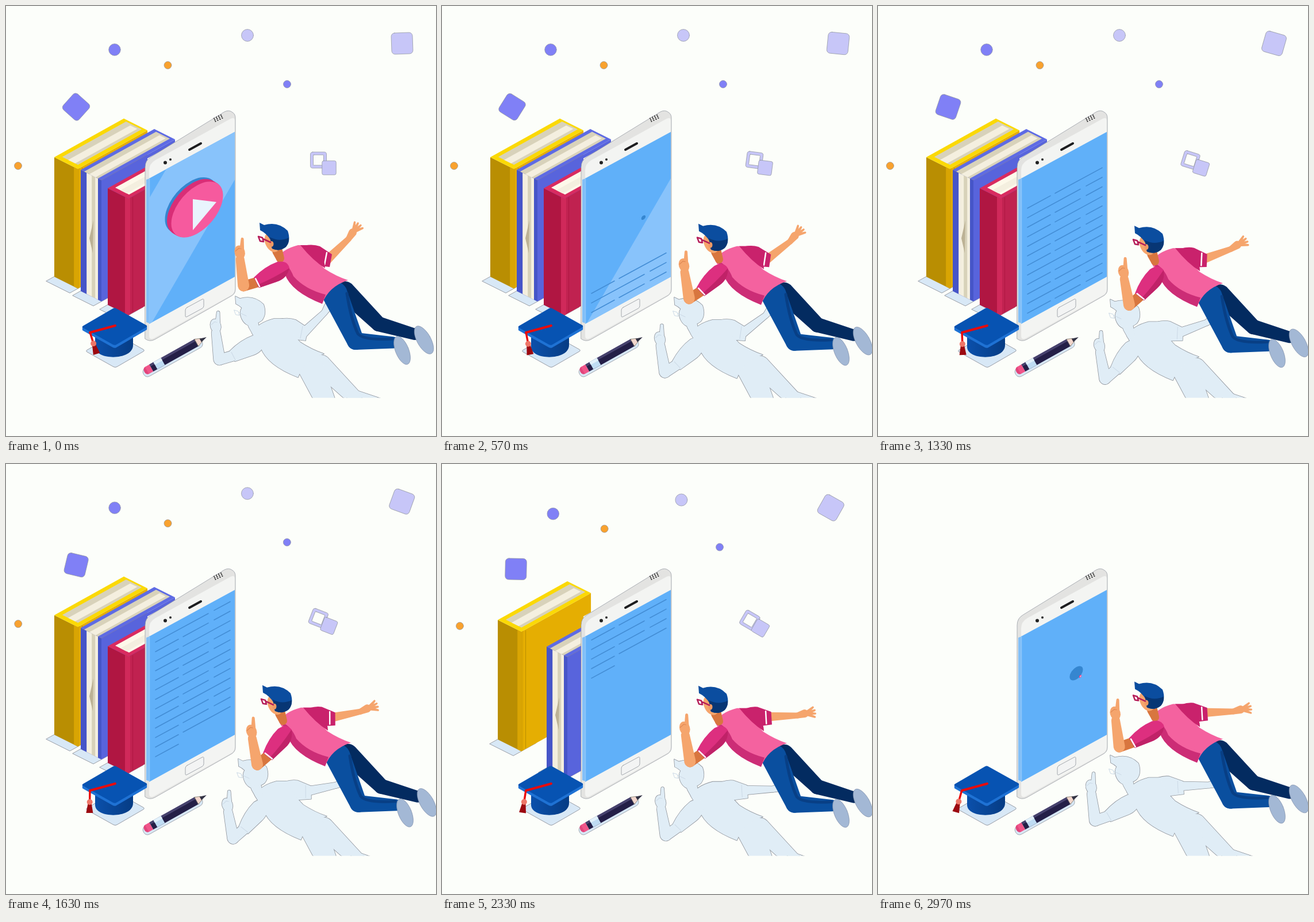
An HTML page with a canvas that plays this animation: 748 by 748 pixels, repeating every 3.01 s.

```html
<!DOCTYPE html>
<html lang="en">
<head>
<meta charset="utf-8">
<title>Online learning</title>
<style>
html, body { margin: 0; width: 100%; height: 100%; overflow: hidden; background: #fcfefa; }
canvas { display: block; width: 748px; height: 748px; }
</style>
</head>
<body>
<canvas id="stage" width="748" height="748"></canvas>
<script>
const c = document.getElementById('stage').getContext('2d');
const LOOP = 3010, TAU = Math.PI * 2, RAD = Math.PI / 180;
const SLOPE = 0.542, DEPTH = -0.555, WIDTH = 0.5;   // slants of the isometric planes
const PAPER = '#fcfefa', GREY = '#8f949c', FLOOR = '#d8e8f6', SKIN = '#f5a56d', DARK_SKIN = '#d8763f';
let time = 0;
let ghost = '';   // '' | 'outline' | 'fill', the passes of the floor shadow

const clamp = v => Math.max(0, Math.min(1, v));

function group(draw) { c.save(); draw(); c.restore(); }

function turn(x, y, degrees) {
  c.translate(x, y);
  c.rotate(degrees * RAD);
  c.translate(-x, -y);
}

function plane(ax, ay, bx, by, x, y, draw) {
  group(() => { c.transform(ax, ay, bx, by, x, y); draw(); });
}

function paint(path, color, edge) {
  if (ghost === 'outline') {
    c.strokeStyle = GREY; c.lineWidth = 1.6; c.stroke(path);
    return;
  }
  c.fillStyle = ghost ? '#e0edf6' : color;
  c.fill(path);
  if (edge && !ghost) { c.strokeStyle = edge; c.lineWidth = 0.7; c.stroke(path); }
}

const shape = (color, d, edge) => paint(new Path2D(d), color, edge);

function oval(color, x, y, rx, ry = rx, tilt = 0, edge) {
  const path = new Path2D();
  path.ellipse(x, y, rx, ry, tilt * RAD, 0, TAU);
  paint(path, color, edge);
}

function rect(color, x, y, w, h, r = 0, edge) {
  const path = new Path2D();
  path.roundRect(x, y, w, h, r);
  paint(path, color, edge);
}

function line(color, width, d) {
  if (ghost === 'outline') return;
  c.strokeStyle = ghost ? '#cbd9e6' : color;
  c.lineWidth = ghost ? 1 : width;
  c.lineCap = c.lineJoin = 'round';
  c.stroke(new Path2D(d));
}

// Tapered tube from joint to joint, each given as [x, y, radius]
function limb(color, ...joints) {
  for (let i = 1; i < joints.length; i++) {
    const [x, y, r] = joints[i - 1], [u, v, s] = joints[i];
    const a = Math.atan2(v - y, u - x);
    const b = Math.acos((r - s) / Math.hypot(u - x, v - y));
    const path = new Path2D();
    path.arc(x, y, r, a + b, a - b + TAU);
    path.arc(u, v, s, a - b, a + b);
    path.closePath();
    paint(path, color);
  }
}

function floaters() {
  // Everything accelerates towards the phone near the end
  const k = Math.min(1, 2 ** ((time - 2955) / 128));
  const at = (x, y, draw) => group(() => {
    c.translate(x + (314 - x) * k, y + (388 - y) * k);
    draw();
  });
  const square = (color, x, y, size, r, angle, hole) => group(() => {
    c.translate(x, y);
    c.rotate(angle * RAD);
    rect(color, -size / 2, -size / 2, size, size, r, GREY);
    if (hole) rect(PAPER, -hole / 2, -hole / 2, hole, hole, 1, GREY);
  });
  const dot = (color, x, y, r) => at(x, y, () => oval(color, 0, 0, r, r, 0, GREY));
  const violet = '#8080f6', lilac = '#c7c6f8', orange = '#f9a22e', s = time / 1000;
  dot(violet, 189, 76, 10.3);
  dot(lilac, 420, 51, 10.5);
  dot(orange, 281.5, 103, 6.5);
  dot(violet, 489, 136, 6.5);
  dot(orange, 21, 278, 6.5);
  at(689, 65, () => square(lilac, 0, 0, 37, 6, 13.5 * s - 2));
  at(122, 175.5, () => square(violet, 0, 0, 37, 6, 42 - 17.5 * s));
  at(552, 274, () => {
    square(lilac, -8.5, -6, 28, 4, 13 * s, 18);
    square(lilac, 10, 7.5, 24.5, 3, 13 * s);
  });
}

function book(start, x, y, thick, depth, height, color, open) {
  const d = 2.8e-4 * Math.max(0, time - start) ** 2;
  const lip = thick / 6, page = '#d8d2ba', white = '#f4efdf';
  x += d;
  y += d * 0.63;
  plane(1, WIDTH, 1, DEPTH, x, y + height, () => rect(FLOOR, 0, -14, thick, 40, 0, GREY));
  plane(1, DEPTH, 0, 1, x + thick, y + thick * WIDTH, () => {
    rect(color.face, 0, 0, depth, height);
    if (!open) {
      rect(color.hinge, 0, 0, 3, height);
      rect(color.spine, 7, 2, 1, height - 3);
    }
  });
  plane(1, WIDTH, 0, 1, x, y, () => {
    rect(color.spine, 0, 0, thick, height);
    if (open) {
      rect(white, lip * 1.7, 0, thick - lip * 2.7, height);
      rect(page, lip * 3.2, 0, lip, height);
    } else rect(color.hinge, thick - lip, 0, lip, height);
  });
  if (open) shape('#bcb295', `M${x + 22} ${y + 88}l-7 31l6 26Z`);
  plane(1, WIDTH, 1, DEPTH, x, y, () => {
    rect(color.top, 0, 0, thick, depth);
    const head = open ? 0 : 7;
    rect(color.page || page, lip, head, thick - lip * 2, depth - head - 3);
    rect(white, lip * 2.5, head, thick - lip * 4.2, depth - head - 6);
  });
}

function books() {
  group(() => {
    c.clip(new Path2D('M0 0H410V175L246 265V748H0Z'));
    book(2115, 84, 263, 41, 121, 208,
      { top: '#fbd905', spine: '#b98e02', face: '#e5ae02', hinge: '#d9a503' });
    book(1900, 130, 285, 36, 128, 211,
      { top: '#5e6be4', spine: '#4655c8', face: '#5864dc' }, true);
    book(1715, 177, 317, 36, 100, 203,
      { top: '#d92b60', spine: '#b01642', face: '#c02250', hinge: '#d0295a', page: '#fdf9ea' });
  });
}

function textLines() {
  const top = 352 - (time - 1330) * 0.195, rows = 14;
  for (let i = 0; i < rows; i++) {
    const y = top + i * 16.6;
    if (y < 306 || y > 540) continue;
    const at = x => `${x} ${y - (x - 260) * SLOPE}`;
    let d = 'M' + at(260);
    if (i === rows - 1) d += 'L' + at(300);
    else {
      if (i % 3 !== 1) d += `L${at(300)}M${at(308)}`;
      if (i % 3 !== 0) d += `L${at(352)}M${at(362)}`;
      d += 'L' + at(390);
    }
    line('#438dd5', 1.6, d);
  }
}

function playButton() {
  const size = (from, to) => clamp(time > 2500 ? (time - from) / 480 : (to - time) / 400);
  const disc = (color, x, y) =>
    plane(1, -SLOPE, 0, 1, x, y, () => oval(color, 0, 0, 45, 42));
  const scaled = (s, draw) => s > 0 &&
    plane(s, 0, 0, s, 353 * (1 - s), 370 * (1 - s), draw);
  scaled(size(2848, 604), () => disc('#3586d0', 321.5, 346.5));
  scaled(size(2950, 550), () => {
    for (let i = 0; i < 8; i++) disc('#d92e77', 325 + i, 349.5 + i * 0.6);
    disc('#f65a9e', 332.5, 354);
    shape('#e9f4fd', 'M325 336L366 341L325 390Z');
  });
}

function phone() {
  shape('#e3e3e1', 'M242 280Q242 268 253 262L380 184Q388 180 394 185Q399 188 399 195V493Q399 501 391 505L259 580Q250 585 242 579Z', GREY);
  shape('#f3f4f2', 'M249 286Q249 274 260 268L389 197Q398 192 398 200V492Q398 500 390 504L259 577Q249 583 249 573Z');
  for (let i = 0; i < 12; i++) {
    const col = i % 4, row = i >> 2;
    oval('#222', 362 + col * 4 + row * 1.2, 195.5 - col * 1.9 + row * 2.6, 1.1);
  }
  oval('#222', 277, 272.5, 3);
  oval('#333', 286, 267, 2.1);
  line('#1d1d1f', 4, 'M319 250L339 239');
  shape('#82bff7', 'M244 302L250 300V552L244 550Z');
  group(() => {
    c.clip(new Path2D('M249 300L398 219V471L249 553Z'));
    rect('#60b0f9', 240, 200, 160, 360);
    const glare = 327 + 0.226 * time;
    if (time < 1300) shape('#88c3fb', `M${glare} 200h130l-209 360h-130Z`);
    textLines();
    playButton();
  });
  line('#8cc6fb', 1.5, 'M249.5 300V552');
  plane(1, -SLOPE, 0, 1, 312, 526, () => rect('#f3f4f4', 0, 0, 32, 16, 3, GREY));
}

function cap() {
  const tile = (color, x, y, size, edge) =>
    plane(1, 0.56, -1, 0.58, x, y, () => rect(color, 0, 0, size, size, 3, edge));
  tile(FLOOR, 190, 570, 52, GREY);
  const side = c.createLinearGradient(155, 0, 221, 0);
  side.addColorStop(0, '#0b50ab');
  side.addColorStop(1, '#063c84');
  shape(side, 'M155 565V593C155 617 221 617 221 590V565Z');
  for (let i = 5; i > 0; i--) tile('#1f72d4', 189, 524.5 + i, 58);
  tile('#0753b2', 189, 524.5, 58);
  line('#e90b0b', 4, 'M190 556L146 568');
  group(() => {
    turn(146, 567, -17 + 33 * time / LOOP);
    line('#e90b0b', 3.5, 'M146 568V584');
    shape('#9c0910', 'M143 590H149L152 607H140Z');
    oval('#ee7668', 146, 588, 5);
  });
}

function pencil() {
  group(() => {
    c.translate(245, 634);
    c.rotate(-0.51);
    rect(FLOOR, -8, -5, 116, 16, 7, GREY);
    oval('#e2447b', 0, 0, 5, 7);
    rect('#f0568a', 0, -7, 9, 14);
    rect('#241f47', 9, -7, 91, 14);
    rect('#47426e', 9, -7, 91, 4);
    rect('#bfdcf3', 17, -7, 15, 14);
    rect('#e2f1fb', 17, -7, 15, 5);
    shape('#f2d6cc', 'M99 -7L109 -3V3L99 7Z', '#776');
    shape('#333344', 'M107 -3.5L119 0L107 3.5Z');
  });
}

function rearArm() {
  const swing = clamp(time / 1930) ** 1.5;
  turn(528, 425, -14 * swing);
  group(() => {
    turn(561, 440, 56 * swing);
    limb(SKIN, [558, 442, 8], [596, 405, 5], [603, 394, 7]);
    for (let i = 0; i < 4; i++) {
      const a = (-82 + i * 19) * RAD;
      limb(SKIN, [604, 393, 3.2], [604 + 18 * Math.cos(a), 394 + 18 * Math.sin(a), 1.7]);
    }
  });
  shape('#c9226c', 'M506 420Q530 412 546 418L567 432L563 454L530 450Z');
  line('#fff', 2.5, 'M558 429L554 450');
}

function legs() {
  limb('#032b60', [590, 496, 17], [648, 553, 13], [711, 571, 10]);
  oval('#a3b8d5', 727, 581, 12, 27, -29, '#7b8ca6');
  limb('#0a4f9f', [572, 501, 22], [608, 583, 15], [674, 585.5, 10]);
  if (!ghost) line('#083f85', 5, 'M593 500Q600 545 612 570Q622 582 672 579');
  oval('#a3b8d5', 689, 599, 11.5, 26, -22, '#7b8ca6');
}

function torso() {
  shape('#f4629f', 'M470 441Q480 423 508 416L527 416Q536 440 554 457Q574 470 595 477Q561 488 550 518Q496 497 485 466Z');
  if (ghost) return;
  shape('#cc2d76', 'M474 441Q492 449 500 470Q520 493 556 502L550 518Q496 497 485 466Z');
  shape('#c9226c', 'M512 416H530L547 430Q555 445 555 456Q534 443 512 416Z');
}

function head() {
  limb(DARK_SKIN, [472, 426, 9], [477, 439, 7]);
  oval(SKIN, 463, 411, 12, 18, -25);
  shape('#0b4d9f', 'M441 377L449 381Q473 374 490 391Q496 408 487 419Q476 428 463 422Q459 414 461 408Q453 395 442 390Z');
  if (!ghost) {
    shape('#073674', 'M459 402Q475 411 492 403Q493 412 487 419Q476 428 463 422Z');
    oval('#ee9a64', 462, 414, 3.5, 5);
  }
  line('#b51c58', 2.5, 'M439 401L446 403L448 410L442 409Z M447 405L460 411');
}

function frontArm() {
  const lift = Math.sin(Math.PI * time / LOOP) ** 0.65;
  turn(488, 458, -25 * lift);
  limb(DARK_SKIN, [437, 480, 9], [413, 487, 9]);
  group(() => {
    turn(413, 487, 21.5 * lift);
    limb(SKIN, [413, 486, 10], [407, 440, 7.5]);
    oval(SKIN, 406.5, 428, 9, 12, -15);
    limb(SKIN, [410, 424, 4], [411, 405, 2.5]);
    line('#dc8450', 1, 'M399 426L405 421L409 422');
  });
  shape('#dd2f7f', 'M431 472Q450 453 472 445Q490 442 493 456Q489 474 470 480L440 490Z');
  if (!ghost) shape('#c02268', 'M437 485Q466 473 493 456Q489 474 470 480L440 490Z');
  line('#fff', 2.5, 'M434 474L441 488');
}

function man() {
  group(rearArm);
  legs();
  torso();
  head();
  group(frontArm);
}

function person() {
  const dx = 5 * clamp(time / 300);
  const dy = dx * 0.3 + 8.5 * Math.sin(Math.PI * (time / LOOP) ** 1.8) ** 2;
  group(() => {
    c.beginPath();
    c.rect(0, 0, 748, 681.5);
    c.clip();
    c.translate(dx - 42, dy + 128);
    for (ghost of ['outline', 'fill']) man();
  });
  ghost = '';
  group(() => { c.translate(dx, dy); man(); });
}

const start = performance.now();

function frame() {
  time = (performance.now() - start) % LOOP;
  rect(PAPER, 0, 0, 748, 748);
  floaters();
  books();
  phone();
  cap();
  pencil();
  person();
  requestAnimationFrame(frame);
}
frame();
</script>
</body>
</html>
```
